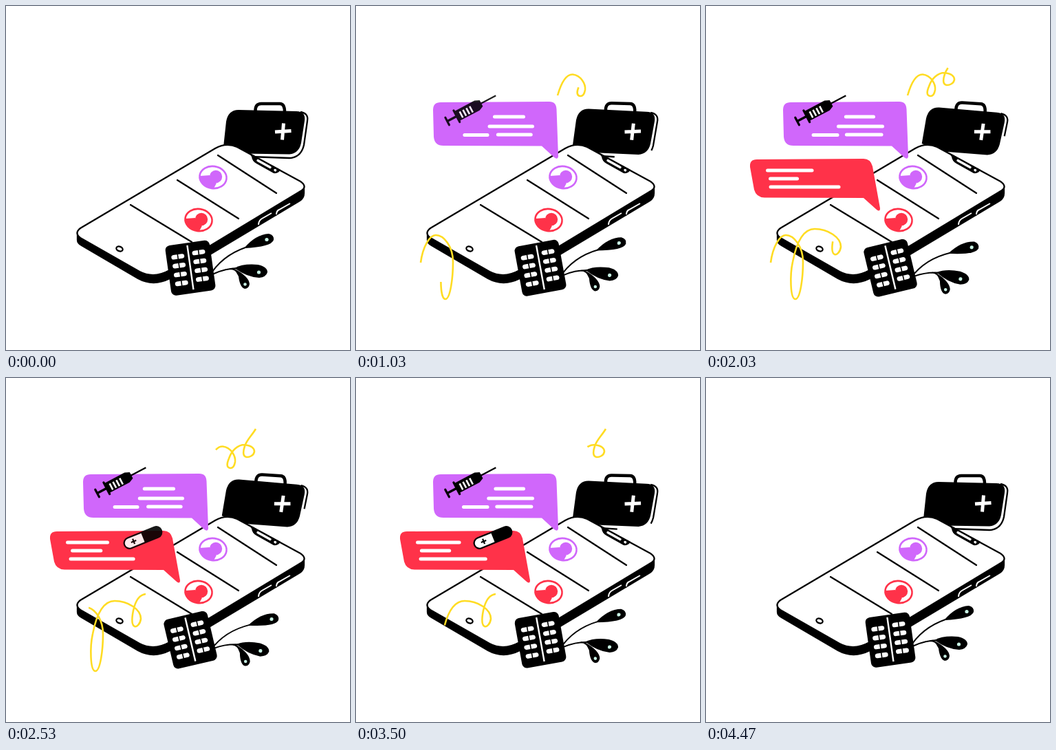
An HTML page for the animation above (4.51 s loop, 500 px wide and 500 px high).

```html
<!DOCTYPE html>
<html lang="en">
<head>
<meta charset="utf-8">
<title>Online consultation</title>
<style>
  html, body { margin: 0; width: 100%; height: 100%; overflow: hidden; background: #fff; }
  svg { display: block; width: 100vw; height: 100vh; }
  .line { fill: none; stroke: #000; stroke-width: 2.3; stroke-linecap: round; stroke-linejoin: round; }
  .curl { fill: none; stroke: #ffdc23; stroke-width: 2.6; stroke-linejoin: round; }
  .text path { fill: none; stroke: #fff; stroke-width: 5; stroke-linecap: round; }
  .purple { color: #d067fb; }
  .red { color: #ff3249; }
</style>
</head>
<body>
<svg viewBox="0 0 500 500">
  <defs>
    <g id="avatar">
      <ellipse rx="19.6" ry="16" transform="rotate(8)" fill="#fff" stroke="currentColor" stroke-width="2.6"/>
      <path d="M-19 -2L-5 -3Q-4 7 5 8.500L1 16A19.600 16 8 0 1 -19 -2Z" fill="currentColor"/>
      <circle cx="4" cy="-1" r="9.200" fill="currentColor"/>
    </g>
    <g id="dose">
      <rect x="-9.500" y="-3.300" width="19" height="6.600" rx="3.300" fill="#fff"/>
      <path d="M0 -4V4" stroke="#000" stroke-width="1.600"/>
    </g>
    <g id="column">
      <use href="#dose" y="-19.5"/><use href="#dose" y="-6.5"/>
      <use href="#dose" y="6.5"/><use href="#dose" y="19.5"/>
    </g>
  </defs>

  <g id="bag">
    <path id="rim" class="line" style="stroke-linecap:butt" d="M428 154Q440 156 438 167L433 202Q429 220 412 221L355 219"/>
    <path d="M316 205L320 168Q323 151 338 151L422 153Q436 153 434 167L429 199Q426 214 412 215.500L345 214.500Z"/>
    <path class="line" style="stroke-width:4.5" d="M362.500 153Q362 142 371 142H398Q405 142 405 154"/>
    <path d="M391 183L414.500 181.500M403.500 170.500L401.500 194.500" fill="none" stroke="#fff" stroke-width="5"/>
  </g>

  <g id="phone">
    <path class="line" style="fill:#000" d="M104 328V340Q104 345 110 348L192 396Q214 408 238 396L427 283Q433 279 433 272V262L320 202Z"/>
    <path class="line" style="fill:#fff" d="M108 323L304 207Q320 198 336 205L428 255Q438 262 430 268L238 384Q215 397 194 386L108 337Q99 330 108 323Z"/>
    <path d="M353 213L399 238Q396 244 389 243L364 229Q358 226 357 219Z"/>
    <path d="M366 224.500L384 234.500M391 238.500l.5 .3" fill="none" stroke="#fff" stroke-width="3.500" stroke-linecap="round"/>
    <path d="M367 318Q367 312 372 309L386 301M393 303Q393 298 397 296L413 287" fill="none" stroke="#fff" stroke-width="2"/>
    <ellipse class="line" cx="165" cy="353" rx="4.800" ry="3.300" transform="rotate(20 165 353)"/>
    <path class="line" d="M308 217L393 272M249 253L338 309M181 289L270 343"/>
    <use href="#avatar" class="purple" x="301" y="249"/>
    <use href="#avatar" class="red" x="280" y="311"/>
  </g>

  <g id="leaves">
    <path class="line" style="stroke-width:2" d="M300 386Q320 358 358 348M300 390Q320 380 345 381M326 382Q334 382 338 390"/>
    <path d="M346 352Q363 332 382 331Q390 333 389 340Q386 350 346 352Z"/>
    <path d="M332 381Q345 374 366 376Q380 379 380 387Q378 394 368 395Q350 394 332 381Z"/>
    <path d="M332 382Q353 393 354 404Q353 411 347 411Q340 409 338 393Z"/>
    <g fill="#c8f3e4">
      <circle cx="379" cy="339.500" r="2.600"/><circle cx="367.500" cy="387" r="2.600"/><circle cx="347.500" cy="404.500" r="2.300"/>
    </g>
  </g>

  <g id="blister">
    <rect x="-32.500" y="-36.500" width="65" height="73.500" rx="7"/>
    <path d="M0 -33V32" stroke="#fff" stroke-width="2.400"/>
    <use href="#column" x="-15.800" y="1"/><use href="#column" x="15" y="-1"/>
  </g>

  <g id="talkA">
    <path fill="#d067fb" d="M123 140L281 139Q291 139 291.500 150L294 219Q293 224 288 220L270 203.500L127 203Q114 203 113 190L112 151Q112 140 123 140Z"/>
    <g class="text" id="textA"></g>
  </g>
  <g id="syringe">
    <path class="line" style="stroke-linecap:butt" d="M20 0H49"/>
    <path d="M-31 0H-15" stroke="#000" stroke-width="3.500"/>
    <path d="M-31 -6V6M-15.500 -9.500V9.500" stroke="#000" stroke-width="3.200" stroke-linecap="round"/>
    <path d="M-15 -8H18L25 -5V5L18 8H-15Z"/>
    <path d="M-8.500 -4V6M-3 -4V6M2.500 -4V6M8 -4V6" stroke="#fff" stroke-width="2.600"/>
  </g>

  <g id="talkB">
    <path fill="#ff3249" d="M74 223L229 222Q239 222 242 233L253 294Q253 300 248 296L229 279L85 278.500Q73 278 70 267L64 234Q63 223 74 223Z"/>
    <g class="text" id="textB"></g>
  </g>
  <g id="pill">
    <rect x="-30" y="-9" width="60" height="18" rx="9"/>
    <path d="M0 -6.800H-21A6.800 6.800 0 0 0 -21 6.800H0Z" fill="#fff"/>
    <path d="M-18.500 0H-10.500M-14.500 -4V4" stroke="#000" stroke-width="2.200"/>
  </g>

  <path class="curl" pathLength="1" d="M293 130C297 116 304 99 315 99.500C327 101 334 113 333 122C332 128 329 131 326 131C320 130 321 124 324 117C328 105 337 97 347 97C354 98 361 101 361 107C360 113 354 115 350 115C343 114 345 105 347 99C350 90 357 84 363 74"/>
  <path class="curl" pathLength="1" d="M94 373C97 350 107 333 116 333C128 333 141 350 141 372C141 395 137 426 130 426C122 426 122 390 126 372C131 346 140 324 158 324C177 324 196 336 196 350C195 358 190 362 187 361C182 359 183 348 185 338C188 324 194 315 203 314"/>
</svg>

<script>
const LOOP = 4510, HALF = 2235, BEAT = HALF * 2 / 3;
const $ = id => document.getElementById(id);
const clamp = x => Math.min(1, Math.max(0, x));
const easeOut = x => 1 - (1 - x) ** 3;
const wave = x => (1 - Math.cos(2 * Math.PI * x)) / 2;
const curls = document.querySelectorAll('.curl');

// Each row: y, then [left, right] when idle and at the far end of the swing.
const rowsA = [
  [161, [205.5, 243.5], [193, 243.5]],
  [175, [190.5, 256.5], [201.5, 256.5]],
  [187.5, [154, 191], [166, 191]],
  [187, [202, 256], [215.5, 250.5]]
];
const rowsB = [
  [239, [89.5, 154], [89.5, 135]],
  [251, [93.5, 132.5], [102.5, 148]],
  [263, [94, 193], [94, 170]]
];

function addRows(group, rows) {
  return rows.map(row => {
    const path = document.createElementNS('http://www.w3.org/2000/svg', 'path');
    group.append(path);
    return { path, row };
  });
}
const textA = addRows($('textA'), rowsA);
const textB = addRows($('textB'), rowsB);

function swingText(lines, t) {
  const k = t < BEAT / 2 ? 0 : wave(t / BEAT - 0.5);
  for (const { path, row: [y, from, to] } of lines) {
    const [l, r] = from.map((v, i) => v + (to[i] - v) * k);
    path.setAttribute('d', `M${l} ${y}H${r}`);
  }
}

// Grow and fade in at `start`, shrink and fade out at `end`, around (x, y).
function pop(el, t, start, end, x, y, span, low, pose) {
  const k = t < end ? clamp((t - start) / span) : 1 - clamp((t - end) / span);
  const s = low + (1 - low) * easeOut(k);
  el.setAttribute('opacity', k);
  el.setAttribute('transform', `translate(${x} ${y}) scale(${s}) ${pose}`);
}

function frame() {
  const t = performance.now() % LOOP;
  const sway = wave(Math.min(t / HALF / 2, 1));

  $('bag').setAttribute('transform', `rotate(${3.6 * sway} 395 165)`);
  $('rim').setAttribute('stroke-dasharray', `${80 - 42 * sway} ${132 * sway} 200`);
  $('blister').setAttribute('transform', `translate(268 380.5) rotate(${-8 - 5.5 * sway})`);
  $('leaves').setAttribute('transform', `translate(${3 * sway} ${3 * sway}) rotate(${6 * sway} 300 385)`);

  const head = clamp(t / HALF), tail = clamp(t / HALF - 1), len = head - tail;
  for (const c of curls) {
    c.style.visibility = len > 0.004 ? 'visible' : 'hidden';
    c.setAttribute('stroke-dasharray', `${len} 2`);
    c.setAttribute('stroke-dashoffset', -tail);
  }

  pop($('talkA'), t, 20, 3540, 292, 222, 400, 0.3, 'translate(-292 -222)');
  pop($('syringe'), t, BEAT / 2, 3500, 160, 153, 330, 0, 'rotate(-27.8)');
  pop($('talkB'), t, BEAT + 20, 3980, 252, 298, 400, 0.3, 'translate(-252 -298)');
  pop($('pill'), t, HALF, 3980, 199, 232, 330, 0, 'rotate(-22)');
  swingText(textA, t);
  swingText(textB, t - BEAT);
  requestAnimationFrame(frame);
}
frame();
</script>
</body>
</html>
```
